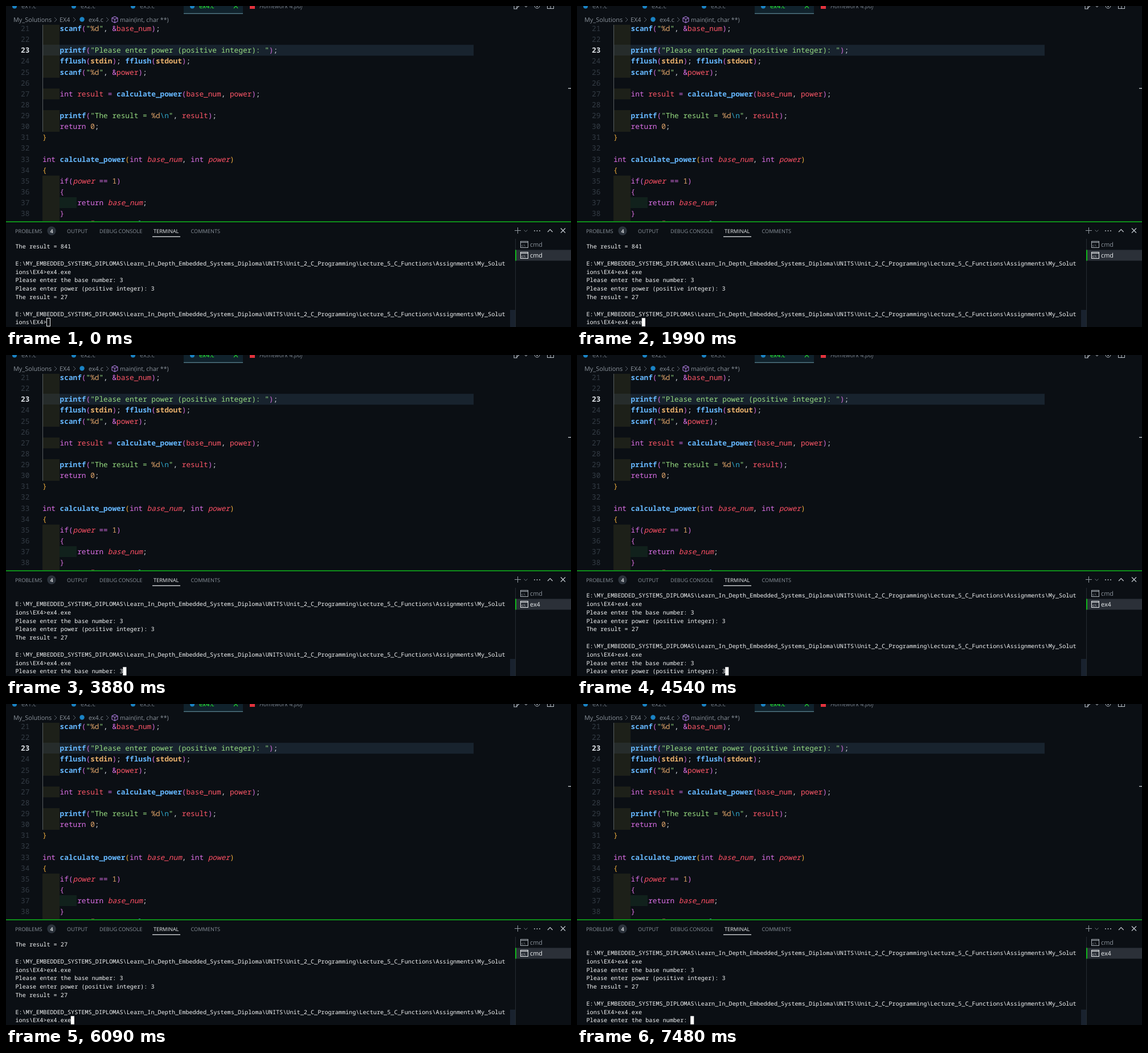
An HTML page with a canvas that plays this animation: 992x564 px, repeating every 8 s.

```html
<!DOCTYPE html>
<html lang="en">
<head>
<meta charset="utf-8">
<title>Terminal session</title>
<style>
html, body { margin: 0; width: 100%; height: 100%; overflow: hidden; background: #0b0f14; }
canvas { display: block; }
</style>
</head>
<body>
<canvas id="stage" width="992" height="564"></canvas>
<script>
const ctx = document.getElementById('stage').getContext('2d');
const LOOP = 8000;
const BG = '#0b0f14', GREEN = '#10b81c', WHITE = '#eceff1', GREY = '#8a929b';
const MONO = '"Noto Sans Mono", "DejaVu Sans Mono", monospace';
const SANS = '"Open Sans", "Noto Sans", sans-serif';

const CODE = { x: 64, y: 39.5, cell: 7.65, row: 19.13, size: 12.75, first: 21 };
const TERM = { x: 16.5, y: 422.6, cell: 6.1, row: 14.78, size: 10.17, rows: 10 };

function rect(x, y, w, h, color) {
  ctx.fillStyle = color;
  ctx.fillRect(x, y, w, h);
}

function dot(x, y, r, color) {
  ctx.fillStyle = color;
  ctx.beginPath();
  ctx.arc(x, y, r, 0, 7);
  ctx.fill();
}

// Each path is a list of x, y pairs.
function lines(color, width, ...paths) {
  ctx.strokeStyle = color;
  ctx.lineWidth = width;
  ctx.beginPath();
  for (const p of paths) {
    ctx.moveTo(p[0], p[1]);
    for (let i = 2; i < p.length; i += 2) ctx.lineTo(p[i], p[i + 1]);
  }
  ctx.stroke();
}

function frame(x, y, w, h, color) {
  ctx.strokeStyle = color;
  ctx.lineWidth = 1;
  ctx.strokeRect(x + 0.5, y + 0.5, w - 1, h - 1);
}

function label(str, x, y, color, size = 10.9, style = '') {
  ctx.font = `${style} ${size}px ${SANS}`;
  ctx.fillStyle = color;
  ctx.fillText(str, x, y);
}

// Monospaced text on a fixed character grid.
function grid(str, x, y, cell, color) {
  ctx.fillStyle = color;
  [...str].forEach((ch, i) => { if (ch !== ' ') ctx.fillText(ch, x + i * cell, y); });
}

// Token styles: the first letter of each piece picks colour and weight.
const STYLES = {
  b: ['#66b8ff', 'bold'], O: ['#e8b06c', 'bold'], o: ['#e0a56a', ''],
  g: ['#96db80', ''], r: ['#ff5768', ''], I: ['#ff5065', 'italic'],
  p: ['#dc70e8', ''], m: ['#d66edd', ''], y: ['#eaaa3c', ''],
  c: ['#2fa9cc', ''], w: ['#ccd2da', '']
};

const SOURCE = [
  'w    |bscanf|m(|g"|o%d|g"|w, |p&|rbase_num|m)|w;',
  'w    ',
  'w    |bprintf|m(|g"Please enter power (positive integer): "|m)|w;',
  'w    |bfflush|m(|Ostdin|m)|w; |bfflush|m(|Ostdout|m)|w;',
  'w    |bscanf|m(|g"|o%d|g"|w, |p&|rpower|m)|w;',
  '',
  'w    |pint |rresult |p= |bcalculate_power|m(|rbase_num|w, |rpower|m)|w;',
  '',
  'w    |bprintf|m(|g"The result = |o%d|c\\n|g"|w, |rresult|m)|w;',
  'w    |preturn |o0|w;',
  'y}',
  '',
  'pint |bcalculate_power|y(|pint |Ibase_num|w, |pint |Ipower|y)',
  'y{',
  'w    |pif|m(|Ipower |p== |o1|m)',
  'w    |m{',
  'w        |preturn |Ibase_num|w;',
  'w    |m}'
];

function drawCode() {
  const { x, y, cell, row, size, first } = CODE;
  ctx.save();
  ctx.beginPath();
  ctx.rect(0, 33, 992, 345);
  ctx.clip();
  rect(64, 68.2, 757, row, '#18232e');
  SOURCE.forEach((src, i) => {
    const n = first + i, mid = y + i * row, top = Math.round(mid - row / 2);
    const h = Math.round(mid + row / 2) - top;
    const current = n === 23;
    if (src.startsWith('w    ')) rect(x, top, 30, h, current ? '#262c2b' : '#1d2019');
    if (src.startsWith('w        ')) rect(94, top, 30, h, '#11211c');
    ctx.font = `${current ? 'bold' : ''} ${size}px ${MONO}`;
    grid(String(n), 26, mid + 4.5, cell, current ? '#dfe3e8' : '#343c45');
    let col = 0;
    for (const part of src ? src.split('|') : []) {
      const [color, face] = STYLES[part[0]], text = part.slice(1);
      ctx.font = `${face} ${size}px ${MONO}`;
      grid(text, x + col * cell, mid + 4.5, cell, color);
      col += text.length;
    }
  });
  rect(64, 374, 30, 5, '#1d2019');
  rect(64, 33, 1, 188, '#565d60');
  rect(150, 377, 5, 1, '#7c3944');
  rect(233, 377, 3, 1, '#48719a');
  ctx.restore();
}

function chevron(x, y, color = '#5d6670') {
  lines(color, 1, [x - 2, y - 4, x + 2, y, x - 2, y + 4]);
}

function drawHeader() {
  rect(312, 0, 104, 14, '#10222c');
  rect(312, 12.7, 104, 1.2, '#5d8794');
  for (let i = 0; i < 4; i++) {
    const x = 15 + i * 104;
    dot(x, 0.5, 4, '#1a83c4');
    label(`ex${i + 1}.c`, x + 12, 4, i === 3 ? '#20d32c' : '#727b85', 10.9, i === 3 ? '600' : '');
  }
  lines('#20d32c', 1.2, [400, -4, 407, 4], [407, -4, 400, 4]);
  rect(428, 0, 9, 5, '#e2323c');
  label('Homework 4.pdf', 445, 4, '#727b85', 10.5, 'italic');

  lines('#b9c0c7', 1.1, [892, 0, 892, 5, 897, 5, 897, 0], [896, 4, 902, -1]);
  lines('#b9c0c7', 1, [910, -1, 913, 2, 916, -1]);
  ctx.beginPath();
  ctx.arc(932.5, -0.5, 4.5, 0, Math.PI);
  ctx.stroke();
  dot(932.5, 0, 1.5, '#b9c0c7');
  frame(950, -6, 12, 11, '#b9c0c7');
  lines('#b9c0c7', 1, [956, -5, 956, 4]);

  label('My_Solutions', 13, 28, GREY);
  chevron(87, 24);
  label('EX4', 94, 28, GREY);
  chevron(120, 24);
  dot(133.5, 23.5, 4.2, '#1a83c4');
  label('ex4.c', 145, 28, GREY);
  chevron(178, 24);
  lines('#a878d8', 1.1, [191, 18.5, 196, 21, 196, 27, 191, 29.5, 186, 27, 186, 21, 191, 18.5],
    [186, 21, 191, 23.5, 196, 21], [191, 23.5, 191, 29]);
  label('main(int, char **)', 200, 28, GREY, 10.6);
  rect(987, 144, 5, 1.3, '#c8ccd0');
}

function consoleIcon(y, color) {
  frame(903, y - 6, 14, 12, color);
  lines(color, 1, [904, y - 3.5, 916, y - 3.5]);
  label('c:\\', 905, y + 3.5, color, 6);
}

function drawPanel(task, thumb) {
  rect(0, 378, 992, 186, BG);
  rect(0, 378.4, 992, 1.5, GREEN);
  const size = 9.2;
  label('PROBLEMS', 16, 398.5, GREY, size);
  dot(80, 395, 7.7, '#2c333c');
  label('4', 77.4, 398.5, WHITE, size, '600');
  label('OUTPUT', 107, 398.5, GREY, size);
  label('DEBUG CONSOLE', 164, 398.5, GREY, size);
  label('TERMINAL', 259, 398.5, WHITE, size);
  label('COMMENTS', 324.5, 398.5, GREY, size);
  rect(257, 404.7, 49, 1.2, WHITE);

  const icon = '#c2c8ce';
  lines('#9299a1', 1, [893, 394.5, 904, 394.5], [898.5, 389, 898.5, 400]);
  lines('#6c747c', 1, [909.5, 393.5, 912.5, 396.5, 915.5, 393.5]);
  for (const x of [928, 932.5, 937]) dot(x, 395, 0.9, icon);
  lines(icon, 1.2, [951, 397, 955.3, 392.5, 959.6, 397]);
  lines(icon, 1.2, [974, 390.5, 982, 398.5], [982, 390.5, 974, 398.5]);

  rect(894, 409, 1, 155, '#252b32');
  rect(885, thumb, 9, 564 - thumb, '#19222e');
  rect(895, 428.5, 97, 19, '#2b3038');
  rect(894, 428.5, 2, 19, GREEN);
  consoleIcon(419, '#a9b0b7');
  label('cmd', 920, 423, GREY);
  consoleIcon(438, WHITE);
  label(task, 920, 442, WHITE);
}

const PATH = 'E:\\MY_EMBEDDED_SYSTEMS_DIPLOMAS\\Learn_In_Depth_Embedded_Systems_Diploma' +
  '\\UNITS\\Unit_2_C_Programming\\Lecture_5_C_Functions\\Assignments\\My_Solut\nions\\EX4>';
const BASE = 'Please enter the base number: ';
const POWER = 'Please enter power (positive integer): ';
const RESULT = 'The result = 27\n\n';
const START = 'The result = 841\n\n' + PATH + 'ex4.exe\n' + BASE + '3\n' + POWER + '3\n' + RESULT + PATH;

// Output and keystrokes by the time they reach the terminal.
const LOG = [
  [1990, 'ex4.exe'], [2510, '\n'], [2580, BASE],
  [3880, '3'], [4000, '\n' + POWER], [4540, '3'],
  [4730, '\n' + RESULT + PATH],
  [6090, 'ex4.exe'], [6550, '\n'], [6610, BASE]
];

function drawTerminal(t) {
  const { x, y, cell, row, size, rows } = TERM;
  const text = LOG.reduce((s, [at, out]) => t >= at ? s + out : s, START);
  const shown = text.split('\n').slice(-rows);
  const last = rows - 1, cx = x + shown[last].length * cell - 0.3;
  ctx.font = `${size}px ${MONO}`;
  shown.forEach((str, i) => grid(str, x, y + i * row + 3.7, cell, '#f4f6f7'));
  if (t < 980) frame(Math.round(cx), 548, 7, 15, '#f2f4f5');
  else rect(cx, 548.3, cell, 14.6, '#ffffff');
  if (t >= 320 && t < 510) {
    rect(16, 547, 860, 1, WHITE);
    rect(16, 561, 49, 1, WHITE);
  }
}

function draw(now) {
  const t = now % LOOP;
  const running = (t >= 2850 && t < 4800) || t >= 7480;
  ctx.textRendering = 'geometricPrecision';
  rect(0, 0, 992, 564, BG);
  drawCode();
  drawHeader();
  drawPanel(running ? 'ex4' : 'cmd', t < 4730 ? 534 : 537);
  drawTerminal(t);
}

const begin = performance.now();
function tick() {
  draw(performance.now() - begin);
  requestAnimationFrame(tick);
}
tick();
</script>
</body>
</html>
```
